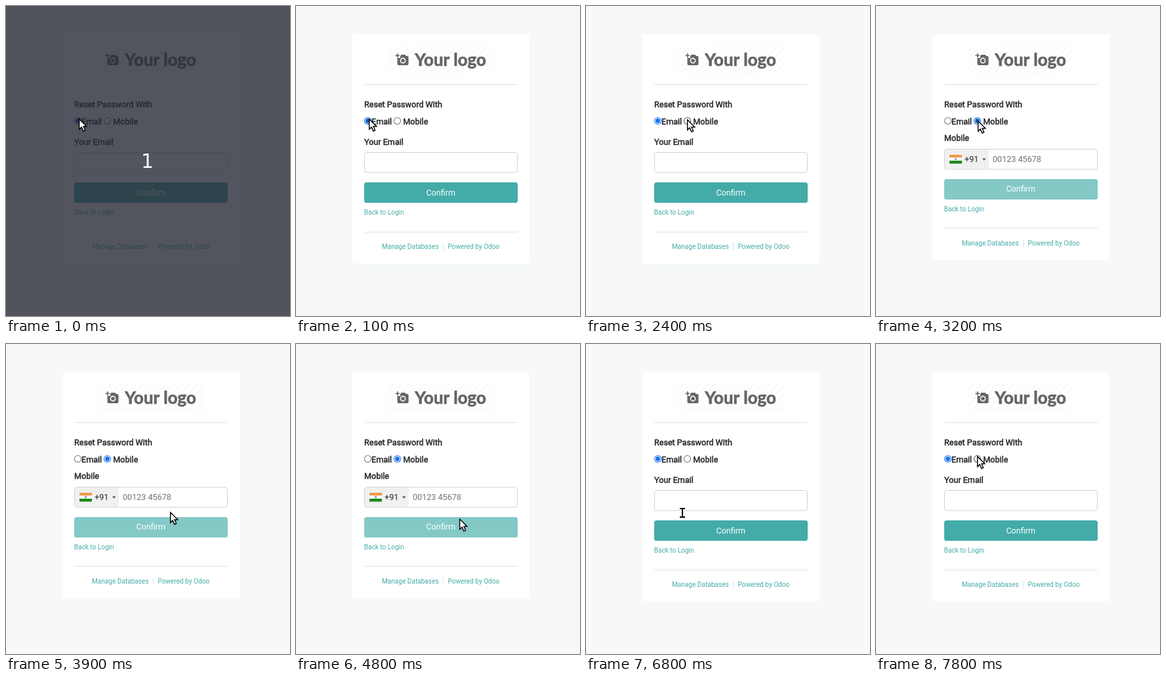
Animation, 433 px wide and 471 px high, one loop 8000 ms. Source, as an HTML page with a canvas:

```html
<!DOCTYPE html>
<html lang="en">
<head>
<meta charset="utf-8">
<title>Reset password</title>
<style>
  html, body { margin: 0; width: 100%; height: 100%; overflow: hidden; background: #f7f9f9; }
  canvas { display: block; width: 433px; height: 471px; }
</style>
</head>
<body>
<canvas id="stage" width="433" height="471"></canvas>
<script>
const ctx = document.getElementById('stage').getContext('2d');
const WIDTH = 433, HEIGHT = 471, LOOP = 8000, STEP = 100;
const TEAL = '#43aca8', INK = '#212529', LINE = '#dee2e6', GRAY = '#656565';
const SANS = 'Roboto, "Liberation Sans", sans-serif';
const LEFT = 104, FULL = 234;

const spot = (x, y, beam = false) => ({ x, y, beam });
const EMAIL = spot(111, 171), MOBILE = spot(154, 172), FIELD = spot(147, 256, true);

const move = (start, end, to, bend = spot(0, 0)) => ({ start, end, to, bend });
const MOVES = [
  move(500, 900, spot(155, 195)),
  move(1100, 1400, spot(196, 202)),
  move(1700, 2200, MOBILE),
  move(2400, 2800, spot(155, 174)),
  move(3300, 3900, spot(250, 255), spot(65, -10)),
  move(4100, 4200, spot(206, 245)),
  move(4300, 5000, spot(323, 244), spot(-80, 33)),
  move(5100, 5500, EMAIL),
  move(6300, 6800, FIELD),
  move(6900, 7000, spot(144, 252)),
  move(7100, 7200, FIELD),
  move(7300, 7800, spot(154, 170))
];

const smooth = p => p * p * (3 - 2 * p);

// Follow each move in turn; a bend bows the path sideways at its middle
function pointerAt(t) {
  let at = EMAIL;
  for (const { start, end, to, bend } of MOVES) {
    if (t <= start) break;
    if (t >= end) { at = to; continue; }
    const p = smooth((t - start) / (end - start));
    const bow = 4 * p * (1 - p);
    return spot(at.x + (to.x - at.x) * p + bend.x * bow, at.y + (to.y - at.y) * p + bend.y * bow);
  }
  return at;
}

// "thicken" outlines the glyphs to embolden them without changing their width
function text(str, x, y, { size = 12.6, weight = 400, thicken = 0, color = INK, align = 'left', font = SANS } = {}) {
  ctx.font = `${weight} ${size}px ${font}`;
  ctx.fillStyle = ctx.strokeStyle = color;
  ctx.textAlign = align;
  ctx.fillText(str, x, y);
  if (thicken) {
    ctx.lineWidth = thicken;
    ctx.strokeText(str, x, y);
  }
}

function box(x, y, w, h, r, fill, stroke) {
  ctx.beginPath();
  ctx.roundRect(x, y, w, h, r);
  if (fill) { ctx.fillStyle = fill; ctx.fill(); }
  if (stroke) { ctx.strokeStyle = stroke; ctx.lineWidth = 1; ctx.stroke(); }
}

function disc(x, y, r, fill) {
  ctx.beginPath();
  ctx.arc(x, y, r, 0, Math.PI * 2);
  ctx.fillStyle = fill;
  ctx.fill();
}

function rect(x, y, w, h, fill) {
  ctx.fillStyle = fill;
  ctx.fillRect(x, y, w, h);
}

function drawLogo() {
  ctx.save();
  ctx.beginPath();
  ctx.rect(139, 60, 163, 44);
  ctx.clip();
  ctx.strokeStyle = '#fbfbfb';
  ctx.lineWidth = 4;
  for (let x = 92; x < 310; x += 12) {
    ctx.beginPath();
    ctx.moveTo(x, 106);
    ctx.lineTo(x + 48, 58);
    ctx.stroke();
  }
  ctx.restore();

  box(154.5, 76, 17, 14, 2, GRAY);
  box(159.5, 74, 8, 4, 1.5, GRAY);
  rect(151, 71, 8, 8, '#fff');
  rect(154, 72, 1.6, 6.5, GRAY);
  rect(151.5, 74.5, 6.5, 1.6, GRAY);
  disc(163, 83, 4.4, '#fff');
  disc(163, 83, 2.8, GRAY);
  text('Your logo', 181.3, 91, { size: 25.8, weight: 700, thicken: 0.7, color: GRAY, font: 'Lato, sans-serif' });
}

function drawRadio(x, checked, mouse, press) {
  const y = 174.5;
  const hover = Math.hypot(mouse.x - x, mouse.y - y) < 7;
  const color = checked ? (hover ? '#005cc8' : '#1a73f0')
    : press ? '#8d8d8d' : hover ? '#4f4f4f' : '#767676';
  disc(x, y, 5.6, color);
  disc(x, y, 4.6, '#fff');
  if (checked) disc(x, y, 3.4, color);
}

function drawField(y) {
  box(LEFT + 0.5, y + 0.5, FULL - 1, 30.5, 3.5, '#fff', '#ced4da');
}

function drawPhone(y) {
  drawField(y);
  box(LEFT + 1, y + 1, 67, 29, [3, 0, 0, 3], '#f0f0f0');
  ['#f2994a', '#fff', '#1c8a1c'].forEach((color, i) => rect(112, y + 9 + i * 4.5, 19, 4.5, color));
  disc(121.5, y + 15.7, 1.6, '#8d8dc5');
  text('+91', 135, y + 20);
  ctx.beginPath();
  ctx.moveTo(162, y + 14.5);
  ctx.lineTo(167.5, y + 14.5);
  ctx.lineTo(164.75, y + 18);
  ctx.fillStyle = '#555';
  ctx.fill();
  text('00123 45678', 178, y + 20, { color: '#6c757d' });
}

function drawForm(mobile, mouse, press) {
  const dy = mobile ? -5 : 0;
  const label = { thicken: 0.45 };
  const small = { size: 10.08, color: TEAL };

  rect(0, 0, WIDTH, HEIGHT, '#f7f9f9');
  box(86, 43, 270, 348 + dy, 3.6, '#fff');
  drawLogo();
  rect(LEFT, 119, FULL, 1, LINE);

  text('Reset Password With', LEFT, 154, label);
  drawRadio(109.5, !mobile, mouse, press);
  text('Email', 115, 180, label);
  drawRadio(154.5, mobile, mouse, press);
  text('Mobile', 163.3, 180, label);

  text(mobile ? 'Mobile' : 'Your Email', LEFT, mobile ? 205 : 211, label);
  if (mobile) drawPhone(217);
  else drawField(222);

  ctx.globalAlpha = mobile ? 0.65 : 1;
  box(LEFT, 268 + dy, FULL, 31, 3.6, TEAL);
  ctx.globalAlpha = 1;
  text('Confirm', 220.7, mobile ? 282 : 288, { color: '#fff', align: 'center' });

  text('Back to Login', 103.7, 317 + dy, small);
  rect(LEFT, mobile ? 337 : 343, FULL, 1, LINE);
  text('Manage Databases', 131, 369 + dy, small);
  rect(224, 360 + dy, 1, 11, LINE);
  text('Powered by Odoo', 231.5, 369 + dy, small);
}

function drawArrow() {
  const shape = new Path2D('M.7 .9V16.3L4.2 13 6.9 19 9.6 17.8 7 12 11.8 11.8Z');
  ctx.shadowColor = 'rgba(0,0,0,.3)';
  ctx.shadowBlur = 2;
  ctx.shadowOffsetY = 1;
  ctx.fillStyle = '#fff';
  ctx.fill(shape);
  ctx.shadowColor = 'transparent';
  ctx.strokeStyle = '#000';
  ctx.lineWidth = 1.4;
  ctx.stroke(shape);
}

function drawBeam() {
  const shape = new Path2D('M-3 -6H3M0 -6V7M-3 7H3');
  ctx.lineCap = 'square';
  for (const [width, color] of [[4, '#fff'], [2, '#000']]) {
    ctx.lineWidth = width;
    ctx.strokeStyle = color;
    ctx.stroke(shape);
  }
}

function drawPointer(mouse, mobile) {
  const top = mobile ? 220 : 225;
  const inField = mouse.x > (mobile ? 172 : LEFT) && mouse.x < LEFT + FULL
    && mouse.y > top && mouse.y < top + 24;
  ctx.save();
  ctx.translate(mouse.x, mouse.y);
  if (mouse.beam || inField) drawBeam();
  else drawArrow();
  ctx.restore();
}

function render(time) {
  const t = Math.floor((time % LOOP) / STEP) * STEP;
  const mobile = t >= 3200 && t < 6000;
  const mouse = pointerAt(t);

  drawForm(mobile, mouse, t === 3100 || t === 5900);
  if (t < 100) {
    rect(0, 0, WIDTH, HEIGHT, 'rgba(40,43,54,.8)');
    text('1', 215.5, 245.6, { size: 30, color: '#fff', align: 'center', font: '"DejaVu Sans", sans-serif' });
  }
  drawPointer(mouse, mobile);
}

const start = performance.now();
function tick() {
  render(performance.now() - start);
  requestAnimationFrame(tick);
}
tick();
</script>
</body>
</html>
```
